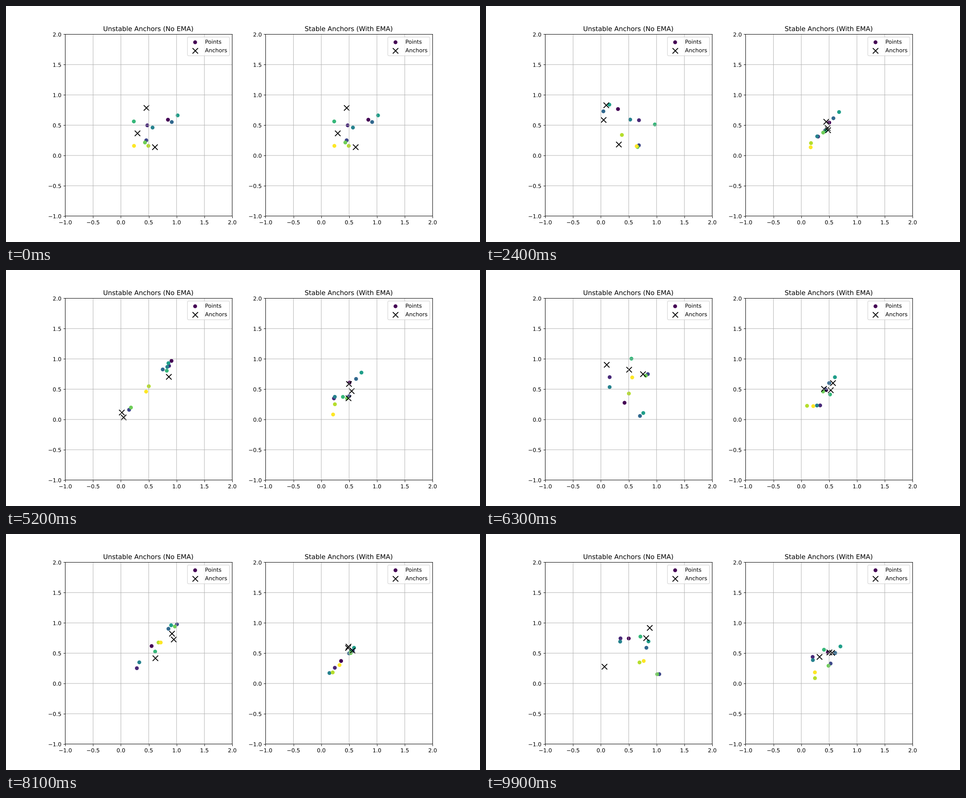
A matplotlib script that plays this animation: 1058x529 px, repeating every 10000 ms.

```python
import numpy as np
import matplotlib.pyplot as plt
from matplotlib.animation import FuncAnimation
from matplotlib.patheffects import Normal

FRAMES = 100
INTERVAL = 100
DECAY = 0.9
N_POINTS = 10

rng = np.random.RandomState(42)
points = rng.rand(N_POINTS, 2)
raw = rng.rand(FRAMES, 3, 2)

# Exponential moving average of the anchors
smooth = raw.copy()
for k in range(1, FRAMES):
    smooth[k] = DECAY * smooth[k - 1] + (1 - DECAY) * raw[k]


def relative(anchors):
    """Place each point by its distances to the first two anchors."""
    gaps = points[:, None, :] - anchors[None, :2, :]
    return np.linalg.norm(gaps, axis=2)


def make_panel(ax, title, anchors):
    pos = relative(anchors)
    dots = ax.scatter(pos[:, 0], pos[:, 1], c=np.arange(N_POINTS),
                      cmap="viridis", label="Points")
    marks = ax.scatter(anchors[:, 0], anchors[:, 1], c="black", marker="x",
                       s=100, label="Anchors")
    ax.set_xlim(-1, 2)
    ax.set_ylim(-1, 2)
    ax.set_title(title)
    ax.legend(loc="upper right")
    ax.grid(True)
    return dots, marks


# Draw lines, markers and text at sub-pixel positions
plt.rcParams.update({
    "font.family": "DejaVu Sans",
    "path.snap": False,
    "path.effects": [Normal()],
})
fig, (left, right) = plt.subplots(1, 2, figsize=(12, 6), dpi=1058 / 12)
panels = [
    (raw, make_panel(left, "Unstable Anchors (No EMA)", raw[0])),
    (smooth, make_panel(right, "Stable Anchors (With EMA)", smooth[0])),
]


def update(frame):
    artists = []
    for track, (dots, marks) in panels:
        dots.set_offsets(relative(track[frame]))
        marks.set_offsets(track[frame])
        artists += [dots, marks]
    return artists


anim = FuncAnimation(fig, update, frames=FRAMES, interval=INTERVAL,
                     init_func=lambda: update(0), repeat=True,
                     repeat_delay=0, blit=False)
plt.show()
```
